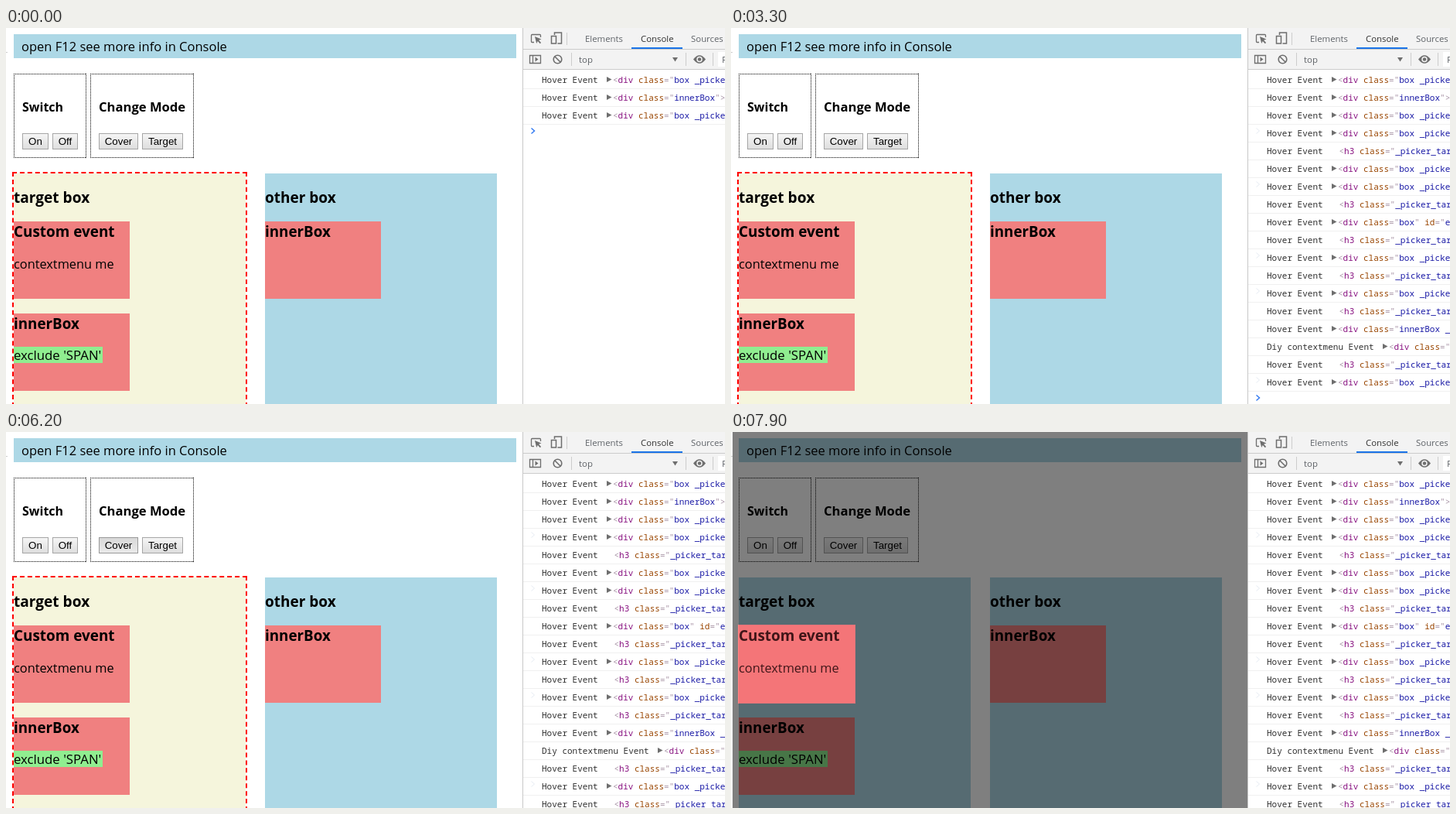
Write an HTML page that moves like this. It is 930 by 486 pixels and loops after 8 s.

```html
<!DOCTYPE html>
<html lang="en">
<head>
<meta charset="utf-8">
<title>Element picker demo</title>
<style>
html, body { margin: 0; width: 100%; height: 100%; overflow: hidden; background: #fff; }
svg { display: block; width: 930px; height: 486px; }
text { white-space: pre; }
.ui { font-family: "Open Sans", sans-serif; }
.b { font-weight: 700; }
.btn { font: 13.33px "Liberation Sans", Arial, sans-serif; text-anchor: middle; }
.tab { font: 11.4px "Open Sans", sans-serif; fill: #5f6368; }
.log { font: 11px "Noto Sans Mono", monospace; fill: #303030; }
</style>
</head>
<body>
<svg id="stage" viewBox="0 0 930 486" xmlns="http://www.w3.org/2000/svg"></svg>
<script>
const LOOP = 8000, PITCH = 23;
const stage = document.getElementById('stage');

const rect = (x, y, w, h, fill, more = '') =>
  `<rect x="${x}" y="${y}" width="${w}" height="${h}" fill="${fill}" ${more}/>`;
const text = (x, y, s, cls, size = '', more = '') =>
  `<text x="${x}" y="${y}" class="${cls}" ${size && `font-size="${size}"`} ${more}>${s}</text>`;
const line = (d, color, more = '') =>
  `<path d="${d}" fill="none" stroke="${color}" ${more}/>`;
const esc = s => s.replace(/</g, '&lt;').replace(/>/g, '&gt;');

// Page elements that can be picked: x, y, width, height
const parts = {
  box: [10, 188, 300, 300],
  title: [10, 206, 300, 26],
  otherTitle: [335, 206, 300, 26],
  custom: [10, 250, 150, 100],
  customTitle: [10, 250, 150, 25],
  innerTitle: [10, 369, 150, 24]
};

const buttons = {
  On: [21, 34], Off: [60, 33], Cover: [120, 51], Target: [176, 53]
};

// Time, picked element
const picks = [
  [0, 'box'], [200, ''], [300, 'box'], [400, 'title'], [600, 'box'],
  [900, 'title'], [1000, ''], [1100, 'otherTitle'], [1300, ''], [1400, 'title'],
  [1800, 'customTitle'], [2000, 'custom'], [3200, 'customTitle'], [3300, 'box'],
  [3400, 'title'], [3500, 'box'], [4600, ''], [5000, 'box'], [5200, 'title'],
  [5400, 'box'], [5500, 'customTitle'], [5600, 'title'], [5800, 'box'],
  [6300, ''], [6500, 'box'], [6700, 'title'], [6900, 'box'],
  [7000, 'customTitle'], [7200, 'custom'], [7600, 'innerTitle'], [7900, 'custom']
];

// Time, button and its state
const presses = [
  [0, ''], [800, 'Target hover'], [900, ''], [3700, 'Cover hover'], [4100, ''],
  [4200, 'Target hover'], [4500, 'Target down'], [4600, 'Target hover'], [5000, ''],
  [6100, 'Cover hover'], [6200, 'Cover down'], [6300, 'Cover hover'], [6500, '']
];

// Time, number of console rows
const counts = [
  [0, 3], [300, 4], [400, 5], [600, 6], [800, 7], [900, 8], [1000, 9], [1100, 10],
  [1300, 11], [1400, 12], [1800, 13], [1900, 14], [2000, 15], [2700, 16],
  [3200, 17], [3300, 18], [3400, 19], [3500, 20]
];

const at = (track, t) => {
  let v = track[0][1];
  for (const [start, value] of track) if (t >= start) v = value;
  return v;
};

// b: picked box, i: inner box, o: other box, h: heading, p: picked inner box, d: custom event
const rows = 'bibbhbbhohbhbhpdhbhb';
const worn = [3, 6, 10, 12, 17];
const kinds = {
  b: 'box _picker_target"', i: 'innerBox"', o: 'box" id="exclude"',
  h: '_picker_target"', p: 'innerBox _picker_target"', d: 'box _picker_target"'
};

function tag(kind) {
  const span = (color, s) => `<tspan fill="${color}">${esc(s)}</tspan>`;
  const [value, id] = kinds[kind].split('" id="');
  const val = value.replace('"', '');
  return span('#a894a6', '<') + span('#881280', kind === 'h' ? 'h3' : 'div') +
    span('#994500', ' class') + span('#a894a6', '="') + span('#1a1aa6', val) +
    span('#a894a6', '"') +
    (id ? span('#994500', ' id') + span('#a894a6', '="') + span('#1a1aa6', id.slice(0, -1)) : '') +
    span('#a894a6', '>');
}

function logRow(kind, i) {
  const y = 67 + i * PITCH, diy = kind === 'd';
  const x = diy ? 851 : kind === 'h' ? 786.5 : 785;
  const arrow = kind === 'h' ? '' :
    `<path d="M${x - 8} ${y - 4}l6.5 3.5l-6.5 3.5z" fill="#6e6e6e"/>`;
  return `<g id="row${i}">` + rect(669, y + 11, 261, 1, '#f0f0f0') +
    text(693, y + 4, diy ? 'Diy contextmenu Event' : 'Hover Event', 'log') +
    arrow + text(x, y + 4, tag(kind), 'log') + '</g>';
}

const chevron = (row, color, width) => {
  const y = 64 + row * PITCH;
  return line(`M679.5 ${y - 3.5}l4 3.5l-4 3.5`, color, `stroke-width="${width}"`);
};

function button([name, [x, w]]) {
  return `<g>` + rect(x + .5, 136.5, w - 1, 20, 'url(#face)', `stroke="#a6a6a6" id="${name}"`) +
    text(x + w / 2, 151, name, 'btn') + '</g>';
}

// One dashed side, the gap adjusted so that dashes meet both ends
function dashed(x1, y1, x2, y2) {
  const len = Math.hypot(x2 - x1, y2 - y1), n = Math.floor((len + 4) / 10);
  const gap = k => (len - 6 * k) / (k - 1);
  const a = gap(n), b = gap(n + 1);
  const g = Math.abs(a - 4) < Math.abs(b - 4) ? a : b;
  return line(`M${x1} ${y1}L${x2} ${y2}`, '#f00', `stroke-width="2" stroke-dasharray="6 ${g}"`);
}

function outline([x, y, w, h]) {
  const l = x - 2, t = y - 2, r = x + w + 2, b = y + h + 2;
  return dashed(l, t + 1, r, t + 1) + dashed(l, b - 1, r, b - 1) +
    dashed(l + 1, t, l + 1, b) + dashed(r - 1, t, r - 1, b);
}

function cover([x, y, w, h]) {
  const hole = `M${x - 1} ${y - 1}h${w + 2}v${h + 2}h${-w - 2}z`;
  return `<path d="M2 0H668V486H2z${hole}" fill="#000" fill-opacity=".5" fill-rule="evenodd"/>` +
    rect(x, y, w, h, 'rgb(255,85,95)', 'fill-opacity=".25"') +
    rect(x - .5, y - .5, w + 1, h + 1, 'none', 'stroke="#f33" stroke-opacity=".6"');
}

function page() {
  const frame = (x, w) =>
    line(`M${x} 59.5h${w}M${x} 167.5h${w}M${x + .5} 59v109M${x + w - .5} 59v109`, '#000',
      'stroke-dasharray="1 1"');
  return rect(0, 31, 2, 1, '#ccc') +
    rect(10, 8, 650, 31, '#add8e6') +
    text(20, 30, 'open F12 see more info in Console', 'ui', 16.5) +
    frame(10, 94) + frame(109, 134) +
    text(21, 108, 'Switch', 'ui b', 16) + text(120, 108, 'Change Mode', 'ui b', 16.6) +
    Object.entries(buttons).map(button).join('') +
    rect(10, 188, 300, 298, '#add8e6', 'id="target"') +
    rect(335, 188, 300, 298, '#add8e6') +
    rect(10, 250, 150, 100, '#f08080') +
    rect(10, 369, 150, 100, '#f08080') +
    rect(335, 250, 150, 100, '#f08080') +
    '<g id="fill"></g>' +
    rect(10, 412, 115, 21, '#90ee90') +
    text(10, 226, 'target box', 'ui b', 19.1) +
    text(335, 226, 'other box', 'ui b', 19) +
    text(10, 270, 'Custom event', 'ui b', 18.9) +
    text(335, 270, 'innerBox', 'ui b', 18.8) +
    text(10, 389, 'innerBox', 'ui b', 18.8) +
    text(10, 311, 'contextmenu me', 'ui', 16.35) +
    text(10, 429, "exclude 'SPAN'", 'ui', 16.8) +
    '<g id="mark"></g>';
}

function tools() {
  const ink = '#6e6e6e';
  return rect(668, 0, 262, 486, '#fff') +
    rect(669, 0, 261, 53, '#f3f3f3') +
    rect(669, 27, 261, 1, '#ccc') + rect(669, 53, 261, 1, '#ccc') +
    rect(668, 0, 1, 486, '#c8c8c8') +
    line('M683 18.5h-2.5q-1 0-1-1v-8q0-1 1-1h10q1 0 1 1v2.5', ink, 'stroke-width="1.3"') +
    `<path d="M684 11l8.5 3.5l-3.4 1.3l3 3.2l-1.3 1.2l-3-3.2l-1.6 3z" fill="${ink}"/>` +
    line('M709.5 9v-3h9v14h-5M705.5 10.5h6v9.500h-6z', ink, 'stroke-width="1.5"') +
    rect(725, 6, 1, 16, '#ccc') +
    text(749, 18, 'Elements', 'tab') +
    text(821, 18, 'Console', 'tab', '', 'style="fill:#333"') +
    text(886, 18, 'Sources', 'tab') +
    rect(809, 25, 66, 2, '#1a73e8') +
    line('M677.500 35.500h14v10h-14zM681.500 35.500v10', ink, 'stroke-width="1.3"') +
    `<path d="M684.500 37.500l4 3l-4 3z" fill="${ink}"/>` +
    `<circle cx="713.5" cy="40.500" r="5.300" fill="none" stroke="${ink}" stroke-width="1.600"/>` +
    line('M709.700 36.700l7.600 7.600', ink, 'stroke-width="1.600"') +
    rect(731, 32, 1, 17, '#ccc') +
    text(741, 45, 'top', 'tab') +
    `<path d="M862 38h7l-3.500 5.500z" fill="${ink}"/>` +
    rect(879, 32, 1, 17, '#ccc') +
    `<path d="M889 40.500q8-10.500 16 0q-8 10.500-16 0z" fill="${ink}"/>` +
    `<circle cx="897" cy="40.500" r="3" fill="${ink}" stroke="#f3f3f3" stroke-width="1.500"/>` +
    rect(914, 32, 1, 17, '#ccc') +
    rect(921, 31, 9, 19, '#fff') +
    text(926, 45, 'Filter', 'tab') +
    [...rows].map(logRow).join('') +
    '<g id="prompt"></g>';
}

const grad = (id, a, b) =>
  `<linearGradient id="${id}" x2="0" y2="1"><stop stop-color="${a}"/><stop offset="1" stop-color="${b}"/></linearGradient>`;

stage.innerHTML = '<defs>' + grad('face', '#f6f6f6', '#dddddd') +
  grad('facehover', '#fafafa', '#e6e6e6') + grad('facedown', '#d8d8d8', '#eaeaea') + '</defs>' +
  page() + tools();

const $ = id => document.getElementById(id);
let last = '';

function draw(t) {
  const pick = at(picks, t), press = at(presses, t), n = at(counts, t);
  const covering = t >= 6500;
  const key = [pick, press, n, covering].join();
  if (key === last) return;
  last = key;

  const part = parts[pick], dash = part && !covering;
  $('target').setAttribute('fill', dash && pick === 'box' ? '#f5f5dc' : '#add8e6');
  $('fill').innerHTML = dash && pick !== 'box' ? rect(...part, '#f5f5dc') : '';
  $('mark').innerHTML = !part ? '' : covering ? cover(part) : outline(part);

  const [name, state] = press.split(' ');
  for (const id in buttons) {
    const on = id === name;
    $(id).setAttribute('fill', `url(#face${on ? state : ''})`);
    $(id).setAttribute('stroke', !on ? '#a6a6a6' : state === 'hover' ? '#555' : '#999');
  }

  for (let i = 0; i < rows.length; i++) $('row' + i).style.display = i < n ? '' : 'none';
  $('prompt').innerHTML = worn.filter(r => r < n).map(r => chevron(r, '#e6ebf3', 1)).join('') +
    chevron(n, '#367cf1', 1.5);
}

function tick() {
  draw(performance.now() % LOOP);
  requestAnimationFrame(tick);
}
tick();
</script>
</body>
</html>
```
